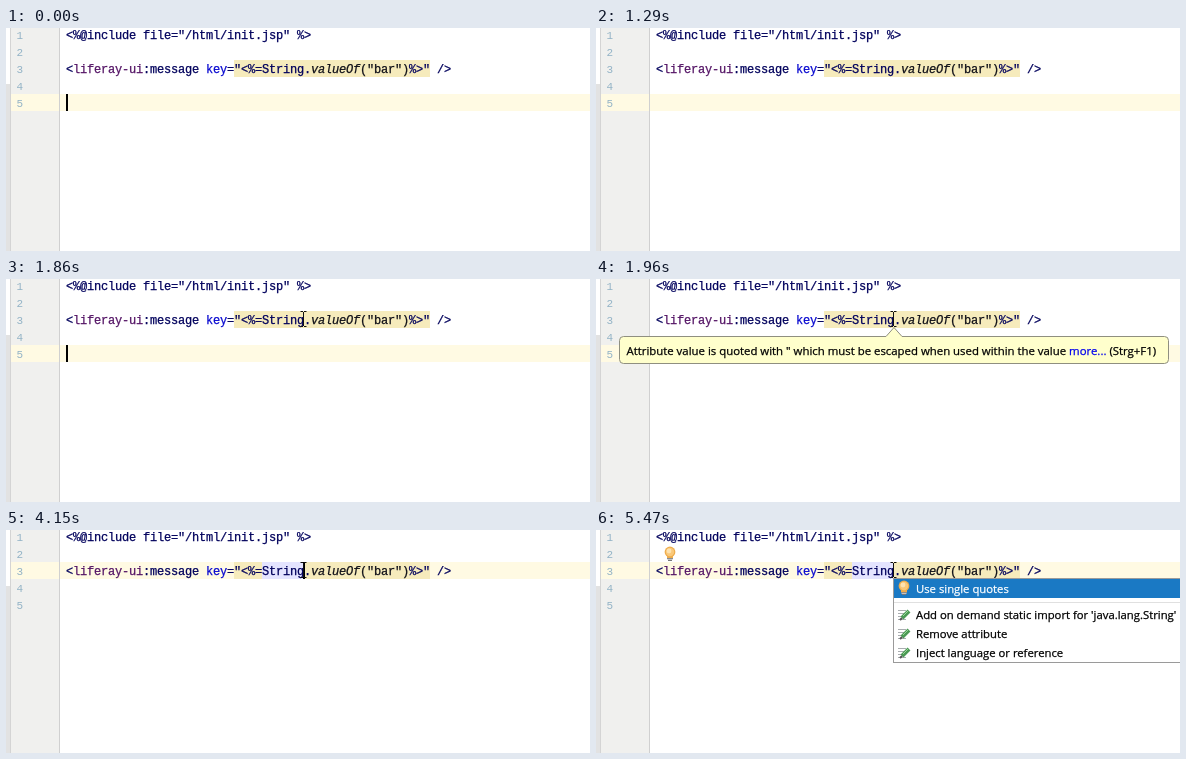
Animation of 584 by 223 pixels, one loop 8 s. Source, as an HTML page with a canvas:

```html
<!DOCTYPE html>
<html lang="en">
<head>
<meta charset="utf-8">
<title>Editor quick fix</title>
<style>
  html, body { margin: 0; width: 100%; height: 100%; overflow: hidden; background: #fff; }
  canvas { display: block; width: 584px; height: 223px; }
</style>
</head>
<body>
<canvas id="stage"></canvas>
<script>
const W = 584, H = 223, LOOP = 8000;
const CHAR = 7, ROW = 17, LEFT = 60;
const MONO = '12px "Liberation Mono", "Courier New", monospace';
const UI = '"Open Sans", "Noto Sans", sans-serif';
const NAVY = '#00005c', PURPLE = '#551566', BLUE = '#0808d0', INK = '#101018';

const canvas = document.getElementById('stage');
const ctx = canvas.getContext('2d');
const ratio = window.devicePixelRatio || 1;
canvas.width = W * ratio;
canvas.height = H * ratio;

const rowTop = n => (n - 1) * ROW - 2;
const colX = n => LEFT + n * CHAR;
const within = (t, from, to) => t >= from && t < to;

function box(x, y, w, h, color) {
  ctx.fillStyle = color;
  ctx.fillRect(x, y, w, h);
}

function disc(x, y, r, color) {
  ctx.beginPath();
  ctx.arc(x, y, r, 0, 7);
  ctx.fillStyle = color;
  ctx.fill();
}

// A hairline outline gives the text its slightly heavy weight.
function label(text, x, y, color, font, weight = 0.25) {
  ctx.font = font;
  ctx.fillStyle = ctx.strokeStyle = color;
  ctx.fillText(text, x, y);
  if (weight) {
    ctx.lineWidth = weight;
    ctx.strokeText(text, x, y);
  }
  return x + ctx.measureText(text).width;
}

function line(points, color, width = 1) {
  ctx.beginPath();
  points.forEach(([x, y]) => ctx.lineTo(x, y));
  ctx.strokeStyle = color;
  ctx.lineWidth = width;
  ctx.stroke();
}

// Each part is [text, color, optional style].
function codeLine(row, parts) {
  let col = 0;
  ctx.letterSpacing = '-0.2px';
  for (const [text, color, style = ''] of parts) {
    label(text, colX(col), rowTop(row) + 13, color, style + ' ' + MONO);
    col += text.length;
  }
  ctx.letterSpacing = '0px';
}

function editor(activeRow, selected) {
  box(0, 0, W, H, '#fff');
  box(0, 56, 4, H - 56, '#e2e2e2');
  box(5, 0, 48, H, '#f0f0ee');
  box(5, rowTop(activeRow), W - 5, ROW, '#fffae3');
  box(4, 0, 1, H, '#d4d4d4');
  box(53, 0, 1, H, '#d0d0d0');
  box(colX(24), rowTop(3), 28 * CHAR, ROW, '#f6ebbc');
  if (selected) box(colX(28), rowTop(3), 6 * CHAR - 1, ROW, '#e4e4ff');

  for (let n = 1; n <= 5; n++) {
    label(n, 10.5, rowTop(n) + 13, '#93b3c6', '11px "Liberation Mono", monospace', 0);
  }
  codeLine(1, [['<%@include file="/html/init.jsp" %>', NAVY]]);
  codeLine(3, [
    ['<', NAVY], ['liferay-ui', PURPLE], [':message ', NAVY],
    ['key', BLUE], ['="<%=String.', NAVY],
    ['valueOf', INK, 'italic'], ['("bar")', INK], ['%>" />', NAVY]
  ]);
}

function caret(x, row) {
  box(x, rowTop(row), 2, ROW, '#000');
}

function beam(x, y) {
  box(x - 0.5, y - 7, 1, 14, '#111');
  for (const edge of [y - 8, y + 7]) {
    box(x - 3, edge, 2.5, 1, '#111');
    box(x + 0.5, edge, 2.5, 1, '#111');
  }
}

// The pointer climbs in a few discrete steps.
const STEPS = [1410, 1520, 1640, 1750, 1860];
function pointer(t) {
  if (t < STEPS[0]) return;
  const p = (STEPS.filter(s => t >= s).length - 1) / (STEPS.length - 1);
  const rest = (1 - p) ** 2;
  beam(Math.round(297 + 34 * rest) + 0.5, Math.round(40 + 171 * rest));
}

function tooltip() {
  const l = 23.5, r = 572.5, top = 57.5, bottom = 84.5, c = 4;
  ctx.beginPath();
  ctx.moveTo(l + c, top);
  ctx.lineTo(290, top);
  ctx.lineTo(298, 48.5);
  ctx.lineTo(306, top);
  ctx.arcTo(r, top, r, bottom, c);
  ctx.arcTo(r, bottom, l, bottom, c);
  ctx.arcTo(l, bottom, l, top, c);
  ctx.arcTo(l, top, r, top, c);
  ctx.closePath();
  ctx.fillStyle = '#ffffcc';
  ctx.fill();
  ctx.strokeStyle = '#8f8f80';
  ctx.lineWidth = 1;
  ctx.stroke();

  const font = '11.4px ' + UI;
  let x = label('Attribute value is quoted with " which must be escaped when used within the value ', 30.5, 76, '#000', font);
  x = label('more...', x, 76, '#0000ee', font);
  label(' (Strg+F1)', x, 76, '#000', font);
}

function bulb(x, y) {
  disc(x, y - 2, 5.4, '#eeac4c');
  box(x - 3, y + 1, 6, 3, '#eeac4c');
  disc(x, y - 2, 4.2, '#fac878');
  disc(x - 1, y - 3, 2.4, '#fde2b0');
  box(x - 3, y + 4, 6, 1, '#8c8c8c');
  box(x - 2.5, y + 5, 5, 1, '#c4c4c4');
  box(x - 2, y + 6, 4, 1, '#777');
}

function pencil(x, y) {
  for (let i = 0; i < 4; i++) box(x - 6, y - 5 + i * 3, 8, 1, '#a9adb0');
  line([[x - 2, y + 3], [x + 5, y - 4]], '#4b9a55', 4);
  line([[x - 1, y + 1], [x + 4, y - 4]], '#9ad698', 1);
  line([[x - 4, y + 5], [x - 2, y + 3]], '#555', 2);
}

function menu() {
  box(297, 48, W - 297, 85, '#9a9a9a');
  box(298, 49, W - 298, 83, '#fff');
  box(298, 49, W - 298, 19, '#1a79c4');
  box(298, 72, W - 298, 1, '#e0e0e0');
  const font = '11.3px ' + UI;
  bulb(308, 58);
  label('Use single quotes', 320, 63, '#fff', font);
  ["Add on demand static import for 'java.lang.String'", 'Remove attribute', 'Inject language or reference']
    .forEach((text, i) => {
      const y = 85 + i * 19;
      pencil(308, y);
      label(text, 320, y + 4, '#000', font);
    });
}

function draw(t) {
  const clicked = t >= 3800;
  ctx.setTransform(ratio, 0, 0, ratio, 0, 0);
  editor(clicked ? 3 : 5, t >= 4150);

  const lowCaret = t < 310 || within(t, 740, 1290) || within(t, 1750, 3800);
  const highCaret = within(t, 3930, 4790) || within(t, 5220, 5470);
  if (lowCaret) caret(LEFT, 5);
  if (within(t, 1960, 3800)) tooltip();
  if (highCaret) caret(297, 3);
  if (t >= 4660) bulb(74, 24);
  pointer(t);
  if (within(t, 3800, 3930)) disc(297, 38, 11, 'rgba(246, 238, 50, 0.72)');
  if (t >= 5470) menu();
}

const start = performance.now();
function tick() {
  draw((performance.now() - start) % LOOP);
  requestAnimationFrame(tick);
}
tick();
</script>
</body>
</html>
```
